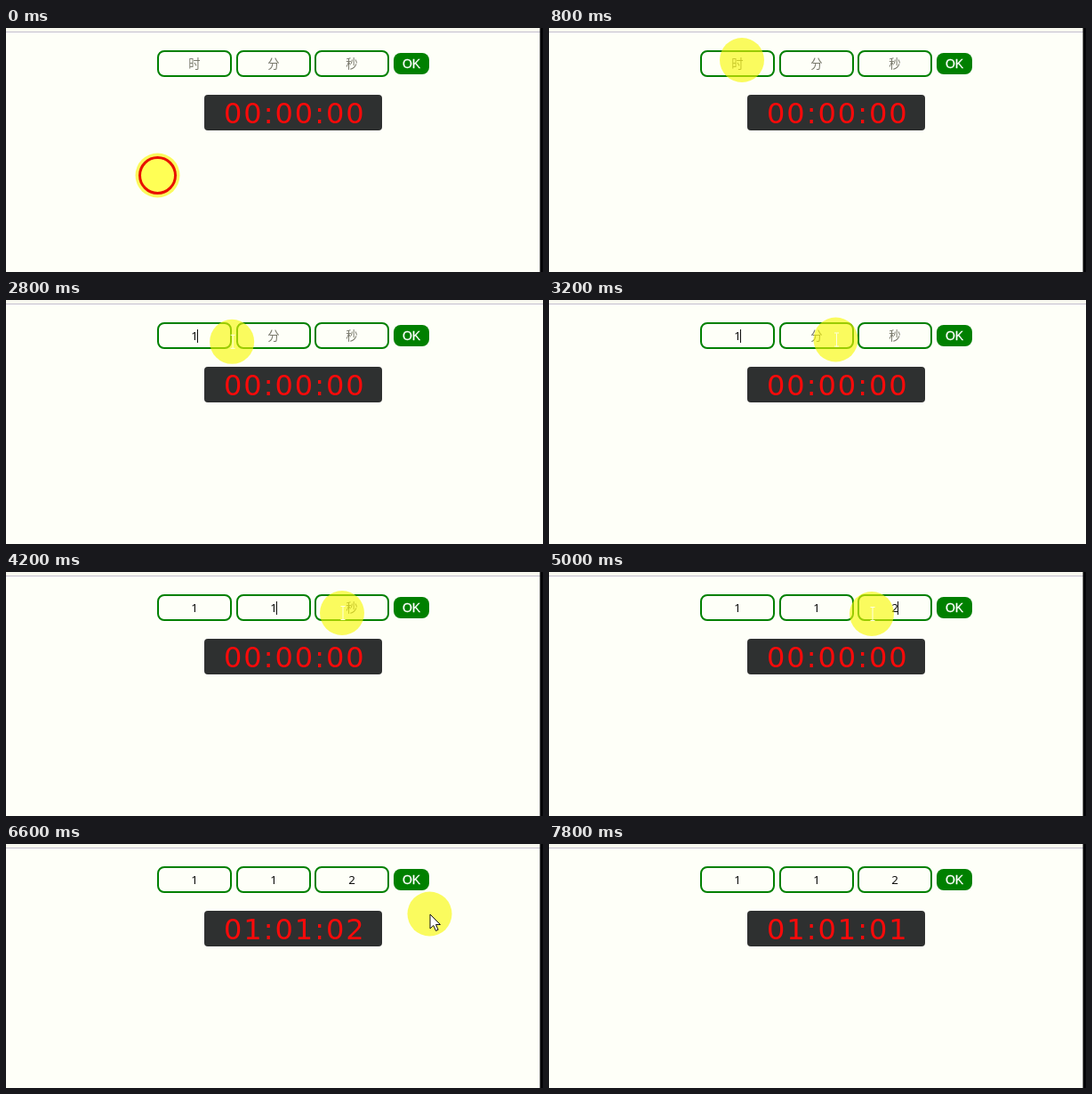
Animation of 604x274 px, one loop 8000 ms. Source, as an HTML page:

```html
<!DOCTYPE html>
<html lang="zh">
<head>
<meta charset="utf-8">
<title>Countdown</title>
<style>
html, body { margin: 0; width: 100%; height: 100%; overflow: hidden; background: #fefff8; }
svg { display: block; width: 604px; height: 274px; }
text { text-anchor: middle; }
.field rect { fill: none; stroke: #008000; stroke-width: 2; }
.hint { font: 13.33px "Noto Sans CJK SC", "Noto Sans CJK", sans-serif; fill: #78786c; }
.value { font: 13.33px "Noto Sans", sans-serif; fill: #111; }
.ok { font: 14px "Liberation Sans", sans-serif; fill: #fff; stroke: #fff; stroke-width: .3; }
#clock { font: 32px "DejaVu Sans", sans-serif; letter-spacing: 2px; fill: #fa0a0a; text-anchor: start; }
</style>
</head>
<body>
<svg viewBox="0 0 604 274">
  <rect width="604" height="274" fill="#fefff8"/>
  <rect width="604" height="4" fill="#f8f8f0"/>
  <rect y="4" width="604" height="1" fill="#c4c0d0"/>
  <rect id="edge" x="600.5" width="3.5" height="274" fill="#040408"/>
  <g id="fields"></g>
  <rect x="436" y="28" width="40" height="24" rx="8" fill="#008000"/>
  <text class="ok" x="456" y="45">OK</text>
  <rect x="223" y="75" width="200" height="40" rx="4" fill="#2e3030"/>
  <text id="clock" x="245" y="107">00:00:00</text>
  <g id="pointer">
    <circle r="25" fill="#f8f800" fill-opacity=".62"/>
    <circle id="ring" r="20" fill="#ff5" stroke="#e81000" stroke-width="3"/>
    <path id="beam" d="M-1.5-7.5h5M1-7V8M-1.5 7.5h5" fill="none" stroke="#ffffe0"/>
    <path id="arrow" d="M.5.5V16.5L4.3 13L7 19L9.6 17.8L7 12H12Z" fill="#fff" stroke="#111"/>
  </g>
</svg>
<script>
const LOOP = 8000, STEP = 200;
const $ = id => document.getElementById(id);

// time, x, y of the pointer
const path = [
  [0, 170.5, 165.5], [200, 170.5, 165.5], [400, 177, 135], [600, 191, 86], [800, 217, 36],
  [1200, 217, 36], [1600, 222, 52], [2000, 222, 48], [2600, 220, 48], [3200, 322.5, 44.5],
  [3800, 325, 45], [4200, 378, 46], [4800, 363, 47], [5200, 363, 47], [5800, 453, 37],
  [6400, 453, 37], [6800, 500, 120], [7200, 640, 230], [LOOP, 640, 230]
];
const clicks = [0, 1600, 3400, 4400, 6000];
const fields = [
  { x: 171, hint: "时", value: "1", focus: 1600, typed: 2800, blur: 3400 },
  { x: 260, hint: "分", value: "1", focus: 3400, typed: 3800, blur: 4400 },
  { x: 348, hint: "秒", value: "2", focus: 4400, typed: 5000, blur: 6000 }
];
const counts = [[7400, "01:01:01"], [6400, "01:01:02"], [0, "00:00:00"]];

function add(parent, tag, attrs) {
  const node = document.createElementNS("http://www.w3.org/2000/svg", tag);
  for (const key in attrs) node.setAttribute(key, attrs[key]);
  return parent.appendChild(node);
}

const show = (node, on) => node.setAttribute("visibility", on ? "visible" : "hidden");

for (const f of fields) {
  const group = add($("fields"), "g", { class: "field" });
  f.mid = f.x + 41;
  add(group, "rect", { x: f.x, y: 26, width: 82, height: 28, rx: 7 });
  f.label = add(group, "text", { x: f.mid, y: 45 });
  f.caret = add(group, "rect", { y: 33, width: 1, height: 15, style: "fill:#111;stroke:none" });
}

function pointerAt(t) {
  const i = path.findIndex(p => p[0] > t);
  const [t0, x0, y0] = path[i - 1], [t1, x1, y1] = path[i];
  const k = (t - t0) / (t1 - t0);
  return [x0 + (x1 - x0) * k, y0 + (y1 - y0) * k];
}

function drawField(f, t) {
  const filled = t >= f.typed;
  const since = t - (filled ? f.typed : f.focus);
  f.label.textContent = filled ? f.value : f.hint;
  f.label.setAttribute("class", filled ? "value" : "hint");
  f.caret.setAttribute("x", f.mid + (filled ? 3 : 1));
  show(f.caret, t >= f.focus && t < f.blur && Math.floor(since / 500) % 2 === 0);
}

function draw(now) {
  const t = Math.floor(now % LOOP / STEP) * STEP;
  const [x, y] = pointerAt(t);
  fields.forEach(f => drawField(f, t));
  $("clock").textContent = counts.find(c => t >= c[0])[1];
  $("pointer").setAttribute("transform", `translate(${x} ${y})`);
  show($("ring"), clicks.includes(t));
  show($("beam"), t >= 1200 && t < 5600);
  show($("arrow"), t >= 5600);
  // the dark window behind is briefly covered
  show($("edge"), t < 2800 || t >= 3800);
}

const start = performance.now();
function tick() {
  draw(performance.now() - start);
  requestAnimationFrame(tick);
}
tick();
</script>
</body>
</html>
```
